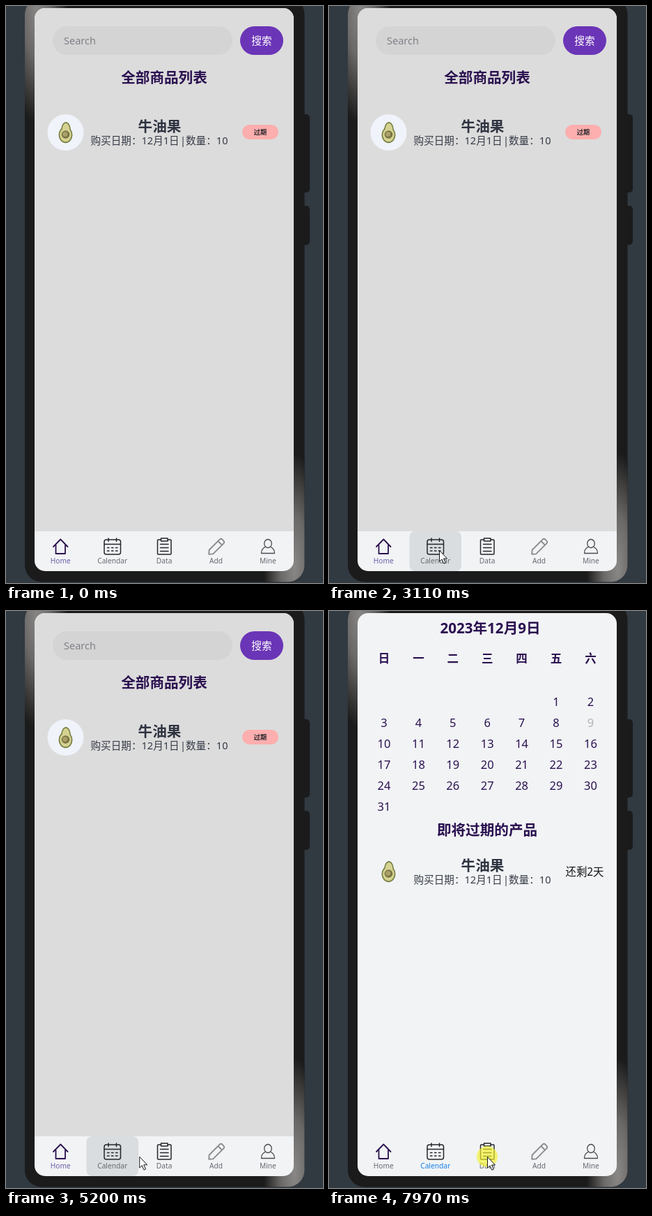
An HTML page that plays this animation: 455 px wide and 826 px high, repeating every 8 s.

```html
<!DOCTYPE html>
<html lang="zh-CN">
<head>
<meta charset="utf-8">
<title>Shopping list</title>
<style>
html, body { margin: 0; width: 100%; height: 100%; overflow: hidden; background: #313941; }
svg { display: block; width: 100%; height: 100%; font-family: "Noto Sans", "Noto Sans CJK SC", "Noto Sans CJK", sans-serif; }
.icon { fill: none; stroke: #24262b; stroke-width: 1.5; stroke-linecap: round; stroke-linejoin: round; }
</style>
</head>
<body>
<svg viewBox="0 0 455 826" xmlns="http://www.w3.org/2000/svg">
  <defs>
    <radialGradient id="shine">
      <stop offset="0" stop-color="#8a8886"/><stop offset=".45" stop-color="#6b6967"/><stop offset="1" stop-color="#1b1b1b"/>
    </radialGradient>
    <clipPath id="body"><rect x="27" y="-12" width="401.5" height="836.5" rx="24"/></clipPath>
    <clipPath id="screen"><rect x="41" y="3" width="372" height="806" rx="15"/></clipPath>
    <g id="avocado">
      <ellipse cx="85.500" cy="3.500" rx="10" ry="11.700" fill="#788044"/>
      <ellipse cx="86" cy="-3" rx="7" ry="12" fill="#788044"/>
      <ellipse cx="85.500" cy="3.500" rx="8.300" ry="9.800" fill="#d6d291"/>
      <ellipse cx="86" cy="-3" rx="5.400" ry="10.300" fill="#d6d291"/>
      <circle cx="85.500" cy="3" r="5.800" fill="#777344"/>
      <circle cx="84.800" cy="2.500" r="3.600" fill="#aaa067"/>
    </g>
  </defs>

  <rect width="455" height="826" fill="#313941"/>
  <rect x="422" y="155" width="14" height="112" rx="5" fill="#1b1b1b"/>
  <rect x="422" y="286" width="14" height="56" rx="5" fill="#1b1b1b"/>
  <g clip-path="url(#body)">
    <rect y="-12" width="455" height="838" fill="#1b1b1b"/>
    <ellipse cx="44" cy="-5" rx="44" ry="172" fill="url(#shine)"/>
    <ellipse cx="414" cy="805" rx="44" ry="165" fill="url(#shine)"/>
  </g>

  <g clip-path="url(#screen)">
    <rect x="41" y="3" width="372" height="806" fill="#f1f3f5"/>
    <g id="home">
      <rect x="41" y="3" width="372" height="749" fill="#dcdcdc"/>
      <rect x="67" y="29" width="258" height="41" rx="20.500" fill="#d4d4d4"/>
      <rect x="336" y="29" width="62" height="41" rx="20.500" fill="#6b35b7"/>
      <circle cx="85.500" cy="181" r="26" fill="#f0f3fa"/>
      <use href="#avocado" y="181"/>
      <rect x="339" y="170" width="52" height="21" rx="10.500" fill="#fdaeae"/>
    </g>
    <g id="calendar"><use href="#avocado" y="373"/></g>

    <rect id="hover" x="115.500" y="752" width="74.500" height="57" rx="8" fill="#d9dddf"/>
    <path class="icon" style="stroke:#2b1150;stroke-width:1.800" d="M68 774L78.300 763.500L88.500 774M71.500 772V784H85V772"/>
    <g class="icon">
      <rect x="141" y="764" width="23.500" height="21" rx="3"/>
      <path d="M141 770.500h23.500M147 762v4.500M158.500 762v4.500"/>
      <path d="M145.500 775.500h15M145.500 780h15" stroke-dasharray="2.500 3.500"/>
    </g>
    <g class="icon">
      <rect x="217.500" y="764" width="19.500" height="21" rx="1"/>
      <rect x="222.500" y="762" width="9.500" height="4" fill="#f1f3f5"/>
      <path d="M221.500 770.500h11.500m-11.500 5h11.500m-11.500 5h11.500"/>
    </g>
    <g class="icon" transform="translate(301.500 774.500) rotate(-45)" style="stroke:#8b8b8e;stroke-width:1.900">
      <path d="M-14.500 0L-10-4H11Q14-4 14-1V1Q14 4 11 4H-10ZM8-4V4"/>
    </g>
    <g class="icon" style="stroke:#4b4c50;stroke-width:1.300">
      <ellipse cx="376" cy="769.500" rx="5.300" ry="6"/>
      <path d="M372 774.500Q366.500 777 366.500 783.500H385.500Q385.500 777 380 774.500"/>
    </g>
    <g id="labels"></g>
  </g>

  <circle id="ring" r="15" fill="#f6f32a" opacity=".65"/>
  <path id="cursor" d="M.5.5V16.300L4 13L6.800 19.300L9.300 18.200L6.500 12H11.500Z" fill="#fff" stroke="#15171a" stroke-linejoin="round"/>
</svg>
<script>
const LOOP = 8000, SWITCH = 6410;
const el = id => document.getElementById(id);

// cy is the optical middle of the glyphs
function label(parent, text, x, cy, size, fill, weight = 400, anchor = 'middle') {
  const node = document.createElementNS('http://www.w3.org/2000/svg', 'text');
  const attrs = { x, y: cy + size * .36, 'font-size': size, fill, 'font-weight': weight, 'text-anchor': anchor };
  for (const name in attrs) node.setAttribute(name, attrs[name]);
  node.textContent = text;
  el(parent).append(node);
  return node;
}

const plum = '#2b1150', grey = '#676a72';
const heading = (page, text, cy, x = 227) => label(page, text, x, cy, 20.6, plum, 700);

function productRow(page, cy) {
  label(page, '牛油果', 220.5, cy - 8.5, 20.6, '#2e3340', 700);
  const detail = (text, x) => label(page, text, x, cy + 12, 14.6, '#363b46', 400, 'start');
  detail('购买日期：12月1日', 121.5);
  detail('|', 250);
  detail('数量：10', 258);
}

label('home', 'Search', 83, 50, 14.5, '#7f8188', 400, 'start');
label('home', '搜索', 367, 49.5, 14.7, '#fff', 500);
heading('home', '全部商品列表', 102.5);
label('home', '过期', 365, 181, 9.2, '#27272b', 600);
productRow('home', 181);

heading('calendar', '2023年12月9日', 25, 231.5);
heading('calendar', '即将过期的产品', 314);
label('calendar', '还剩2天', 367, 373, 15.4, '#15161b');
productRow('calendar', 373);
const columnX = i => 79 + i * 49.4;
[...'日一二三四五六'].forEach((day, i) => label('calendar', day, columnX(i), 68, 16.5, plum, 700));
for (let day = 1; day <= 31; day++) {
  const cell = day + 4;
  label('calendar', day, columnX(cell % 7), 130 + 30.1 * Math.floor(cell / 7), 16.5, day === 9 ? '#b4b4b8' : plum);
}

const tabs = ['Home', 'Calendar', 'Data', 'Add', 'Mine'].map((name, i) =>
  label('labels', name, 78.3 + i * 74.4, 794.5, 10.2, grey, 500));

// Pointer gestures: each eases along a quadratic curve from the last resting point
const gestures = [
  { from: 1000, to: 1710, bend: [160, 730], end: [154, 769] },
  { from: 2350, to: 2420, bend: [152, 779], end: [158, 779] },
  { from: 3110, to: 3780, bend: [148, 811], end: [175, 786] },
  { from: 4070, to: 4870, bend: [300, 875], end: [246, 701] },
  { from: 4920, to: 5400, bend: [218, 801], end: [140, 785] },
  { from: 5400, to: 5700, bend: [150, 786], end: [173, 786] },
  { from: 6100, to: 6300, bend: [166, 786], end: [159, 785] },
  { from: 6450, to: 6890, bend: [174, 786], end: [189, 785] },
  { from: 6990, to: 7470, bend: [210, 787], end: [227, 781] }];
const clicks = [1870, 2360, 6240, 7890];
const CLICK_TIME = 110;

function ramp(t, from, to) {
  const p = Math.min(1, Math.max(0, (t - from) / (to - from)));
  return p * p * (3 - 2 * p);
}

function pointer(t) {
  let at = [216, 828];
  for (const { from, to, bend, end } of gestures) {
    const p = ramp(t, from, to), q = 1 - p;
    at = at.map((v, k) => q * q * v + 2 * q * p * bend[k] + p * p * end[k]);
  }
  return at;
}

function draw(t) {
  const onCalendar = t >= SWITCH;
  el('home').style.display = onCalendar ? 'none' : '';
  el('calendar').style.display = onCalendar ? '' : 'none';
  tabs[0].style.fill = onCalendar ? grey : '#6f60a8';
  const tint = onCalendar ? 60 + 40 * ramp(t, SWITCH, SWITCH + 150) : 0;
  tabs[1].style.fill = `color-mix(in srgb, #1a80e5 ${tint}%, ${grey})`;
  const dip = .7 * (ramp(t, 6270, 6330) - ramp(t, 6330, 6450));
  el('hover').style.opacity = ramp(t, 1880, 2200) - dip - ramp(t, 6990, 7250);

  const place = `translate(${pointer(t).map(v => v.toFixed(1)).join(' ')})`;
  el('cursor').setAttribute('transform', place);
  el('ring').setAttribute('transform', place);
  el('ring').style.display = clicks.some(c => t >= c && t < c + CLICK_TIME) ? '' : 'none';
}

const start = performance.now();
function tick() {
  draw((performance.now() - start) % LOOP);
  requestAnimationFrame(tick);
}
tick();
</script>
</body>
</html>
```
